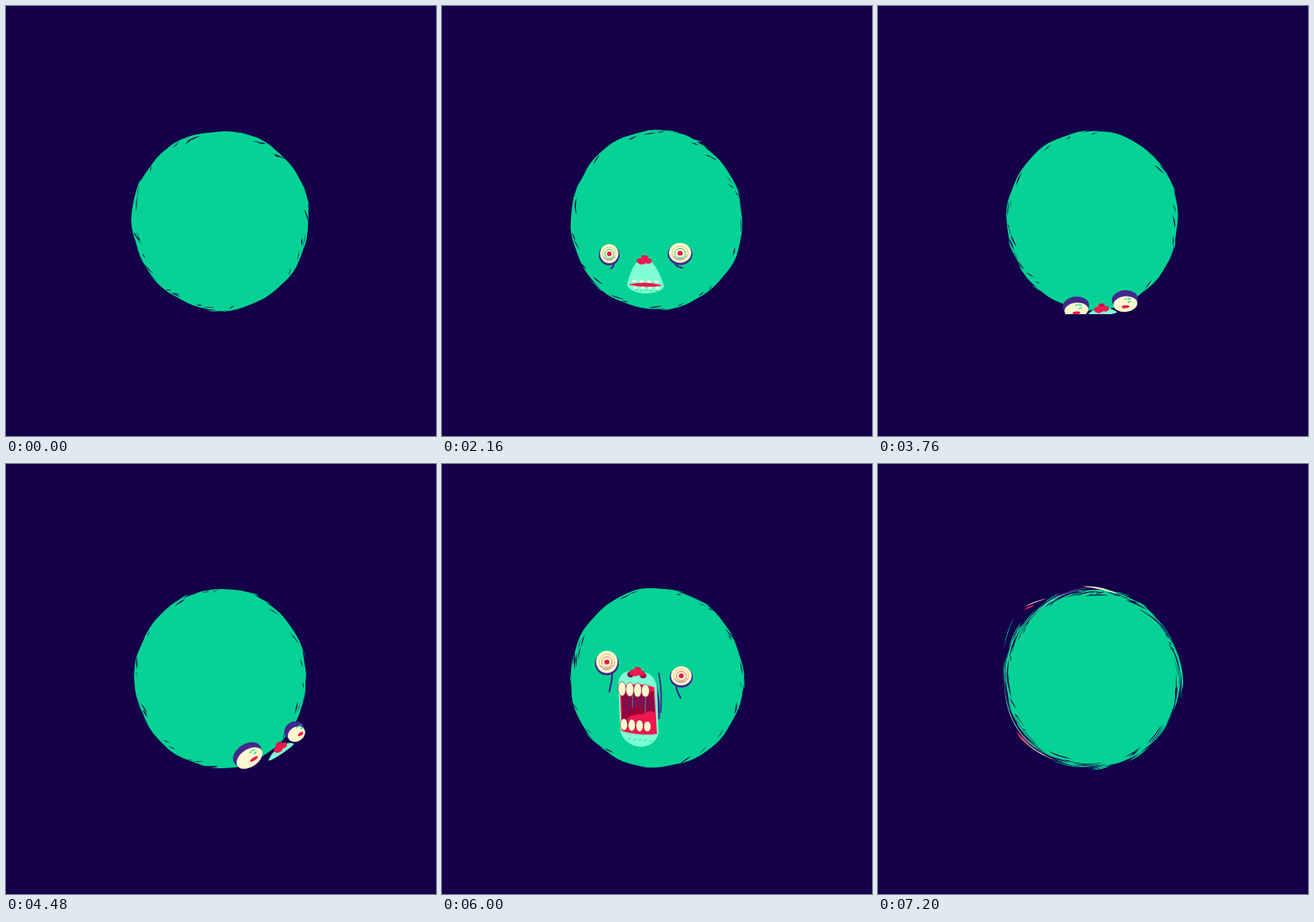
Recreate the animation shown at these times as an HTML page. Size 540 px wide and 540 px high, loop 7.28 s.

```html
<!DOCTYPE html>
<html lang="en">
<head>
<meta charset="utf-8">
<title>Rolling head</title>
<style>
html, body { margin: 0; width: 100%; height: 100%; overflow: hidden; background: #140149; }
svg { display: block; width: 100vw; height: 100vh; }
</style>
</head>
<body>
<svg id="stage" viewBox="0 0 540 540"></svg>
<script>
const STEP = 80, COUNT = 91, CX = 269.5, CY = 269;
const BG = '#140149', GREEN = '#06d295', MINT = '#80ffd5', CREAM = '#fff8ce',
      RED = '#f0164f', WINE = '#9d0038', PURPLE = '#43278c';
const stage = document.getElementById('stage');

// time, left eye x y rx ry, right eye x y rx ry, nose x y, muzzle axes u and v, open, lid, turn
const KEYS = [
  [1200, 257, 239.5, 14, 14.5, 341, 215, 11, 12, 305, 229, 50, -14, 13, 125, 1, 0, .08],
  [2160, 210, 311, 11.5, 12, 299, 310, 14, 12.5, 254, 319, 46, 1, 2, 42, 0, 0, 0],
  [3040, 193, 359, 12, 9, 257, 373.5, 18.5, 11.5, 217, 370, 42, 13, 1, 9, 0, 1, -.1],
  [4480, 305, 368, 18, 12, 364, 338, 11.5, 10, 344, 355, 32, -21, 2, 9, 0, 1, .1],
  [6000, 207, 248.5, 13.5, 14, 300.5, 266, 13, 12, 245, 261, 49, 4, 3, 94, 1, 0, -.1]
];

const mix = (a, b, k) => a + (b - a) * k;
const clamp = k => Math.max(0, Math.min(1, k));
const ease = k => { k = clamp(k); return k * k * (3 - 2 * k); };
const f = n => n.toFixed(1);

function seeded(seed) {
  let s = seed * 7919 + 13;
  return () => {
    s = s + 0x6D2B79F5 | 0;
    let x = Math.imul(s ^ s >>> 15, 1 | s);
    x = x + Math.imul(x ^ x >>> 7, 61 | x) ^ x;
    return ((x ^ x >>> 14) >>> 0) / 4294967296;
  };
}

const fill = (d, color, extra = '') => `<path d="${d}" fill="${color}" ${extra}/>`;
const line = (d, color, w, extra = '') =>
  `<path d="${d}" fill="none" stroke="${color}" stroke-width="${w}" stroke-linecap="round" ${extra}/>`;
const oval = (x, y, rx, ry, color, extra = '') =>
  `<ellipse cx="${f(x)}" cy="${f(y)}" rx="${f(rx)}" ry="${f(ry)}" fill="${color}" ${extra}/>`;
const ring = (x, y, rx, ry, color, w) =>
  oval(x, y, rx, ry, 'none', `stroke="${color}" stroke-width="${w}"`);

function polar(a, r) {
  return f(CX + Math.cos(a) * r) + ' ' + f(CY + Math.sin(a) * r);
}

// A tapered stroke that follows the rim
function sliver(a, span, r0, r1, w, color) {
  const m = a + span / 2, r = (r0 + r1) / 2 / Math.cos(span / 2);
  return fill(`M${polar(a, r0)}Q${polar(m, r + w)} ${polar(a + span, r1)}Q${polar(m, r - w)} ${polar(a, r0)}Z`, color);
}

function ball(t, rand) {
  const wild = ease((t - 6560) / 560);
  const rx = 107.5 + 3.5 * Math.pow(Math.abs(Math.cos(Math.PI * t / 7280)), 8), ry = 112.5;
  const p = [0, 1, 2].map(() => rand() * 6.28);
  const edge = a => 1 / Math.hypot(Math.cos(a) / rx, Math.sin(a) / ry)
    + .7 * Math.sin(3 * a + p[0]) + .6 * Math.sin(7 * a + p[1]) + .4 * Math.sin(15 * a + p[2]) - wild;
  let d = '', out = '';
  for (let i = 0; i < 90; i++) {
    const a = i / 90 * Math.PI * 2;
    d += (i ? 'L' : 'M') + polar(a, edge(a));
  }
  out += fill(d + 'Z', GREEN);
  for (let i = 0; i < 26 + wild * 50; i++) {
    const a = rand() * 6.28, span = .06 + rand() * (.12 + wild * .15);
    const r = edge(a + span / 2) - 1 - rand() * 4;
    out += sliver(a, span, r - rand() * 3, r + rand() * 2, .5 + rand() * 1.1, BG);
  }
  for (let i = 0; i < 14 + wild * 26; i++) {
    const a = rand() * 6.28, span = .12 + rand() * .25;
    const r = edge(a + span / 2) + rand() * (1 + wild * 2);
    out += sliver(a, span, r - 2, r + rand(), .6 + rand(), GREEN);
  }
  return out;
}

function smear(t) {
  if (t < 6880) return '';
  const a = (7200 - t) / 400;
  return sliver(3.6 + a, .9, 108, 113, .9, BG)
    + sliver(2.0 + a, 1.2, 113, 110, .9, MINT)
    + sliver(3.85 + a, .85, 107, 114, .9, MINT)
    + sliver(4.2 + a, .45, 113, 111, 2, PURPLE)
    + sliver(3.95 + a, .25, 124, 115, .9, CREAM)
    + sliver(3.92 + a, .13, 122, 117, 2, RED)
    + sliver(4.6 + a, .42, 116, 110, 2.2, CREAM)
    + sliver(2.32 + a, .22, 115, 117, 2.2, RED)
    + sliver(1.98 + a, .52, 113, 118, .9, CREAM)
    + sliver(3.45 + a, .36, 117, 125, .8, GREEN);
}

function pose(t) {
  let i = 0;
  while (i < KEYS.length - 2 && t > KEYS[i + 1][0]) i++;
  const a = KEYS[i], b = KEYS[i + 1];
  const raw = clamp((t - a[0]) / (b[0] - a[0])), k = ease(raw);
  const v = a.map((n, j) => mix(n, b[j], k));
  if (i === 2) for (const j of [2, 6, 10]) v[j] += 17 * Math.sin(Math.PI * raw);
  const [, lx, ly, lrx, lry, rx, ry, rrx, rry, nx, ny, ux, uy, vx, vy, open, lid, turn] = v;
  return { left: { x: lx, y: ly, rx: lrx, ry: lry }, right: { x: rx, y: ry, rx: rrx, ry: rry },
    nose: { x: nx, y: ny }, ux, uy, vx, vy, open, lid, turn };
}

// Carries a point round the ball; k is its remaining width
function spin(p, yaw) {
  if (!yaw) return { ...p, k: 1 };
  const r = Math.sqrt(Math.max(900, 112 * 112 - (p.y - CY) ** 2));
  const a = Math.asin(Math.max(-.95, Math.min(.95, (p.x - CX) / r)));
  const k = Math.cos(a + yaw) / Math.cos(a);
  return { ...p, x: CX + r * Math.sin(a + yaw), k: Math.max(0, Math.min(1.3, k)) };
}

function eye(e, side, p, rand) {
  if (e.k < .06) return '';
  const { open, lid, turn } = p, rx = e.rx * e.k, ry = e.ry;
  const tilt = lid * Math.atan2(p.uy, p.ux) * 180 / Math.PI;
  let out = '', s = '';
  if (lid < .6) {
    const x = e.x - side * rx * .45, y = e.y + ry * .8;
    const end = side < 0 ? x - 3 : x + 5 + 4 * (1 - open);
    out += line(`M${f(x)} ${f(y)}Q${f(x + side * -2)} ${f(y + 6)} ${f(end)} ${f(y + 9 + open * (side < 0 ? 17 : 9))}`, PURPLE, 2.2);
  }
  s += oval(0, mix(1.8, -4, lid), rx + 1.5, ry + 1, PURPLE);
  s += oval(0, lid * 1.5, rx, ry - lid, CREAM);
  const px = turn * 45 * lid + rand() - .5, py = lid * ry * .45 + rand() - .5;
  if (lid < .5) {
    s += ring(px, py, rx * .72, ry * .72, '#d8b86a', .8);
    s += ring(px, py, rx * .48, ry * .48, open > .5 ? '#dd7d68' : GREEN, 1);
    s += line(`M${f(-rx * .6)} ${f(ry * .35)}Q0 ${f(ry)} ${f(rx * .6)} ${f(ry * .3)}`, PURPLE, .6);
  } else {
    s += line(`M${f(px + 4)} ${f(py - 5)}l3 -1m-7 -3l2 -1m2 0l3 1`, GREEN, 1.3);
  }
  s += oval(px, py, mix(rx * .24, rx * .32, lid), mix(3, 1.9, lid), RED);
  return out + `<g transform="translate(${f(e.x)} ${f(e.y)}) rotate(${f(tilt)})">${s}</g>`;
}

function muzzle(n, p, rand) {
  if (n.k < .06) return '';
  const { open: o, lid, turn } = p, side = turn < 0 ? -1 : 1, w = n.k;
  const P = (x, y) => f(n.x + x * p.ux * w + y * p.vx) + ' ' + f(n.y + x * p.uy + y * p.vy) + ' ';
  const X = (x, y) => P(x * side, y);
  let out = '';
  if (o > .4) {
    out += line(`M${X(-.56, 0)}Q${X(-.64, .25)}${X(-.57, .52)}`, PURPLE, 1.8);
    out += line(`M${X(-.42, .1)}Q${X(-.56, .25)}${X(-.52, .6)}`, PURPLE, 2.4);
  }
  const sh = mix(.74, .22, o), cx = mix(.36, .48, o), cy = mix(.18, 0, o);
  out += fill(`M${P(-.14, 0)}Q${P(-cx, cy)}${P(-.5, sh)}L${P(-.48, .82)}Q${P(-.36, 1)}${P(.04, 1)}`
    + `Q${P(.4, .97)}${P(.5, .8)}L${P(.5, sh)}Q${P(cx, cy)}${P(.14, 0)}Z`, MINT);
  if (lid < .5) {
    for (let i = 0; i < 5; i++) {
      const x = -.3 + i * .14;
      out += line(`M${P(x, .92)}L${P(x + .08, .88 + rand() * .03)}`, GREEN, .7);
    }
    const mt = mix(.66, .16, o), tc = mix(.74, .23, o), bc = mix(.75, .81, o);
    const mb = mix(.86, .86, o);
    out += fill(`M${P(-.45, tc)}Q${P(0, mt - .04)}${P(.43, tc - .04 * o)}L${P(.46, bc)}Q${P(0, mb)}${P(-.45, bc)}Z`, RED);
    if (o > .25) {
      out += fill(`M${P(-.42, .29)}L${P(.41, .25)}L${P(.43, .72)}L${P(-.42, .73)}Z`, WINE);
      for (let i = 0; i < 9; i++) {
        const x = -.38 + i * .085 + rand() * .03, y = .3 + rand() * .06;
        out += line(`M${X(x, y)}L${X(x + .02, y + .1 + rand() * .14)}`, i % 4 === 2 ? '#1d8c9b' : PURPLE, 1.3);
      }
      out += fill(`M${X(-.43, .53)}Q${X(-.3, .48)}${X(-.12, .56)}Q${X(.2, .57)}${X(.3, .65)}L${X(.2, .75)}L${X(-.43, .74)}Z`, RED);
    }
    const tooth = (x, y, rx, ry) => {
      const [tx, ty] = P(x, y).split(' ').map(Number);
      return oval(tx, ty, rx * w, ry, CREAM, `stroke="${WINE}" stroke-width="${f(.6 * o)}"`);
    };
    for (let i = 0; i < 4; i++) {
      const x = (i - 1.5) * .2 + turn, h = rand();
      out += tooth(x, mix(.64, .245, o), mix(2.6, 5, o), mix(1.8, 8, o) + h * o);
      out += tooth(x + .02, mix(.83, .72, o), mix(2.4, 4.6, o), mix(1.6, 6.6, o) + h * o);
    }
  }
  const tilt = Math.atan2(p.uy, p.ux) * 180 / Math.PI;
  let s = '';
  if (o > .4) s += oval(-8, 4, 4, 3.6, WINE) + oval(8, 4, 4, 3.6, WINE) + oval(-8, 5, 2, 1.6, PURPLE);
  s += fill('M-10 1Q-8 -3 -4 -2Q-4 -7 1 -6Q5 -6 5 -2Q10 -2 9.500 2Q7 6 2 4Q-3 7 -6 5Q-8 5 -10 1Z', RED);
  if (lid > .5) s += line('M-1 -3Q1 -5 3 -3', WINE, 1);
  return out + `<g transform="translate(${f(n.x)} ${f(n.y)}) rotate(${f(tilt)}) scale(${f(w)} 1)">${s}</g>`;
}

function face(t, rand) {
  const yaw = 1.9 * (1 - ease((t - 320) / 720)) - 2.6 * ease((t - 6240) / 720);
  const p = pose(t);
  return muzzle(spin(p.nose, yaw), p, rand)
    + eye(spin(p.left, yaw), -1, p, rand)
    + eye(spin(p.right, yaw), 1, p, rand);
}

function draw(n) {
  const t = n * STEP;
  stage.innerHTML = '<clipPath id="reach"><path d="M154 153H387V387H154Z"/></clipPath>'
    + `<rect width="540" height="540" fill="${BG}"/><g clip-path="url(#reach)">`
    + ball(t, seeded(n + 1)) + face(t, seeded(n + 500)) + smear(t) + '</g>';
}

const start = performance.now();
let last = -1;
function tick() {
  const n = Math.floor((performance.now() - start) / STEP) % COUNT;
  if (n !== last) draw(last = n);
  requestAnimationFrame(tick);
}
tick();
</script>
</body>
</html>
```
